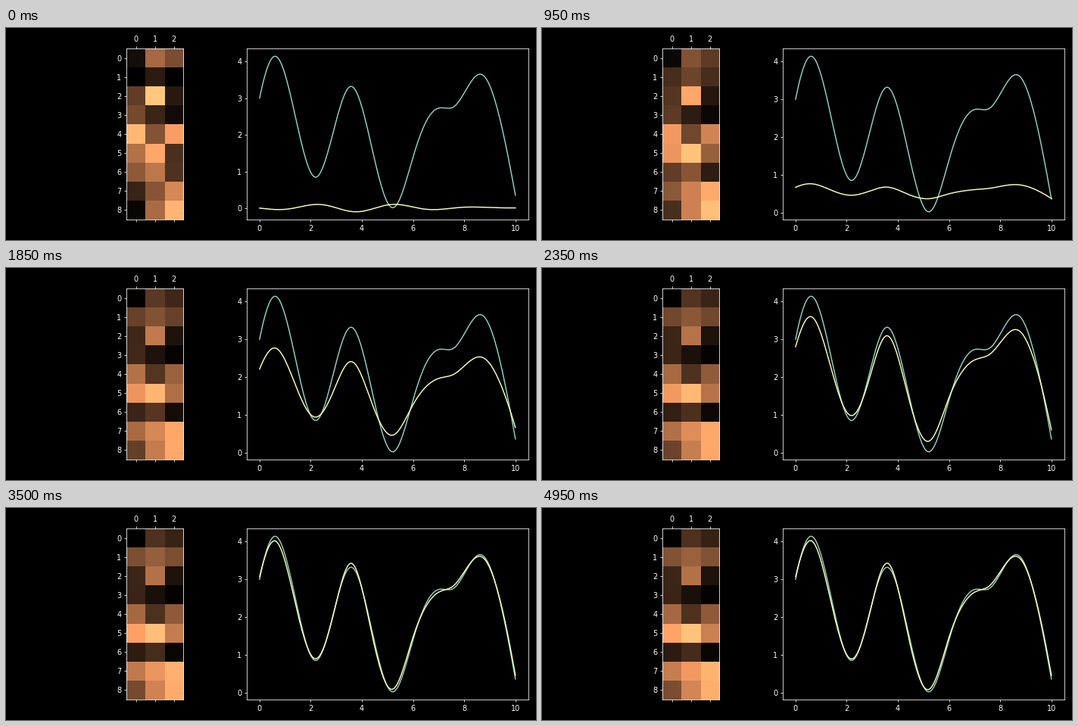
A matplotlib script that plays this animation: 700x280 px, repeating every 5000 ms.

```python
import numpy as np
import matplotlib.pyplot as plt
from matplotlib.animation import FuncAnimation

W, H, DPI = 700, 280, 70
FRAMES, INTERVAL = 100, 50


def spline(knots, values, x):
    """Cubic spline with not-a-knot ends."""
    def basis(p):
        p = np.asarray(p)[:, None] / 10
        inner = np.asarray(knots[2:-2]) / 10
        return np.hstack([p ** np.arange(4), np.maximum(p - inner, 0) ** 3])
    return basis(x) @ np.linalg.solve(basis(knots), values)


def settle(t, scale, power=1):
    """Progress from 0 towards 1; a higher power starts more slowly."""
    return 1 - np.exp(-(t / scale) ** power)


# Turning points and midpoints of the curve to learn and of the trained fit
x = np.linspace(0, 10, 200)
knots = [0, .3, .62, 1.4, 2.18, 2.88, 3.58, 4.39, 5.2, 6, 6.5, 7, 7.6, 8.7, 9.4, 10]
goal = spline(knots, [3, 3.82, 4.14, 2.5, .85, 2.08, 3.32, 1.65, .02, 1.4, 2.35,
                      2.73, 2.77, 3.64, 2.42, .36], x)
trained = spline(knots, [3.07, 3.77, 4.02, 2.36, .89, 2.05, 3.43, 1.55, .08, 1.47, 2.28,
                         2.66, 2.84, 3.59, 2.45, .45], x)
ripple = .02 + .11 * np.cos(2 * (x - 2.2)) * np.exp(-((x - 3.8) / 3.5) ** 2)

# First weights, and how strongly training lifts each row
first = np.array([
    [.07, .53, .39],
    [0, .14, 0],
    [.31, 1, .13],
    [.37, .19, .06],
    [.92, .42, .79],
    [.57, .84, .24],
    [.45, .6, .25],
    [.18, .43, .68],
    [.03, .54, .91],
])
lift = np.array([-.04, .42, .02, -.02, .02, .52, -.11, .54, .38])[:, None]


def weights(t):
    shrink = 1 - .45 * settle(t, 26, 2.2)
    return np.clip(shrink * first + settle(t, 24) * lift, 0, 1)


def fit(t):
    """A rippled flat line that rises and then takes the trained shape."""
    gain = settle(t, 38.4, 3)
    level = 2 * (t / 60) ** 1.5
    return gain * trained + (1 - gain) * level + ripple * np.exp(-t / 20)


plt.style.use("dark_background")
fig = plt.figure(figsize=(W / DPI, H / DPI), dpi=DPI)


def add_axes(left, width):
    return fig.add_axes([left / W, 27 / H, width / W, 226 / H])


ax_grid = add_axes(159, 226 / 3)
image = ax_grid.matshow(weights(0), cmap="copper", vmin=0, vmax=1, aspect="auto")
ax_grid.set_xticks(range(3))
ax_grid.set_yticks(range(9))

ax_plot = add_axes(318, 371.7)
ax_plot.plot(x, goal)
fit_line, = ax_plot.plot(x, fit(0))


def update(i):
    image.set_data(weights(i))
    fit_line.set_ydata(fit(i))
    ax_plot.relim()
    ax_plot.autoscale_view()
    return image, fit_line


anim = FuncAnimation(fig, update, frames=FRAMES, interval=INTERVAL, repeat=True)
plt.show()
```
